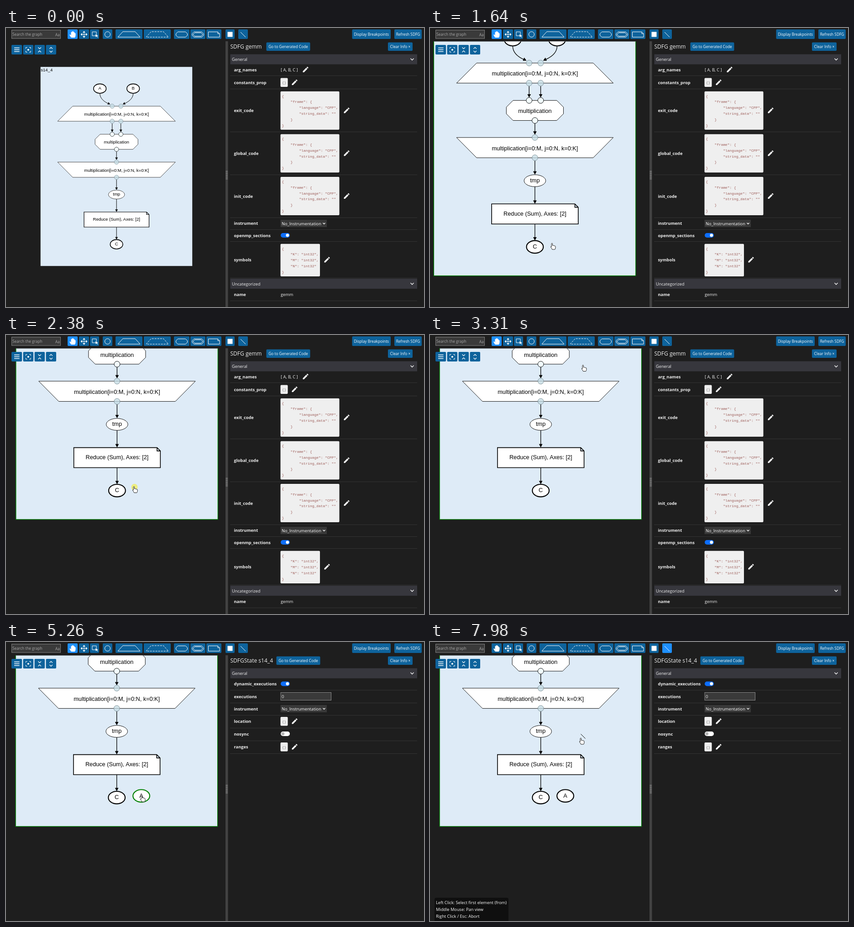
These frames come from a looping animation (916 px wide and 611 px high, 8 s). An HTML page:

```html
<!DOCTYPE html>
<html lang="en">
<head>
<meta charset="utf-8">
<title>Graph editor</title>
<style>
html, body { margin: 0; width: 100%; height: 100%; overflow: hidden; background: #1e1e1e; }
svg { display: block; }
text { font: 500 9.25px "Open Sans", "Noto Sans", sans-serif; fill: #f0f0f0; white-space: pre; }
.small { font-size: 8.3px; fill: #fff; }
.title { font-size: 12px; }
.key { font-weight: 700; font-size: 9.3px; }
.code { font: 7.9px "Liberation Mono", monospace; fill: #9c5b57; }
.btn { fill: #0e639c; }
.on { fill: #1e90ff; }
.icon { fill: none; stroke: #fff; stroke-width: 1; }
.bold { stroke-width: 1.3; }
.solid { fill: #fff; stroke: none; }
.white { fill: #fff; }
.dim { fill: #a8a8a8; font-weight: 400; }
.node text, .label { font: 9.55px "Liberation Sans", Arial, sans-serif; fill: #000; stroke: none; }
.node text { text-anchor: middle; }
.node { fill: #fff; stroke: #000; stroke-width: .7; }
.edge { fill: none; stroke: #000; }
.edge polygon { fill: #000; stroke: none; }
.hover { stroke: green; }
.edge.hover polygon { fill: green; }
</style>
</head>
<body>
<svg id="stage" width="916" height="611" viewBox="0 0 916 611"></svg>
<script>
const rect = (x, y, w, h, attrs = '') => `<rect x="${x}" y="${y}" width="${w}" height="${h}" ${attrs}/>`;
const text = (x, y, s, cls = '', attrs = '') => `<text x="${x}" y="${y}" class="${cls}" ${attrs}>${s}</text>`;
const path = (d, cls = 'icon', attrs = '') => `<path d="${d}" class="${cls}" ${attrs}/>`;
const group = (id, body, attrs = '') => `<g id="${id}" ${attrs}>${body}</g>`;

// ---- toolbar ----
const button = (x, w, icon = '', id = '', y = 3, h = 21) =>
  rect(x, y, w, h, `rx="2" class="btn" ${id && `id="${id}"`}`) + icon;
const label = (x, w, s, y = 3, h = 21) =>
  button(x, w, text(x + w / 2, y + h / 2 + 3, s, 'small', 'text-anchor="middle"'), '', y, h);
const trapezoid = (x, dash = '') => path(`M${x} 20l11-12h27l11 12z`, 'icon', dash);
const octagon = (x, y, w, h, c) =>
  `M${x + c} ${y}h${w - 2 * c}l${c} ${c}v${h - 2 * c}l${-c} ${c}h${2 * c - w}l${-c} ${-c}v${2 * c - h}z`;

const toolbar =
  rect(12.5, 4.5, 107, 18.5, 'fill="#3a3a3a" stroke="#858585"') +
  text(14, 17, 'Search the graph', 'small dim') + text(108, 18, 'Aa', 'small dim') +
  button(135, 22, path('M142 20L139.3 15.5Q139 13.8 141 14.5L142.5 16V9.5Q143.3 8 144.2 9.5V13V8Q145.2 6.5 146.2 8V13V7.7Q147.2 6.3 148.2 8V13V9.5Q149.3 8 150.3 9.7V13V11.5Q151.5 10.3 152.5 12V16Q152.5 19 150.5 21H143.5z', 'solid'), 'pan') +
  button(160, 22, path('M171 9.5V18M166.5 14H175.5') +
    path('M171 6.5l3 3.5h-6zM171 21.5l3-3.5h-6zM163.5 14l3.5-3v6zM178.5 14l-3.5-3v6z', 'solid')) +
  button(184, 20, path('M197 17h-8v-8.5h9v6') + path('M196 14l6 2.5l-2.5 1l2 2.5l-1 .8l-2-2.5l-1.8 1.8z', 'solid')) +
  button(212, 21, '<circle cx="222.5" cy="14" r="6" class="icon"/>', 'add') +
  button(240, 59, trapezoid(245)) +
  button(302, 59, trapezoid(307, 'stroke-dasharray="4 2"')) +
  button(368, 34, path(octagon(372.5, 8.5, 25, 11.5, 4))) +
  button(404, 33, path(octagon(408, 8.5, 25, 11.5, 4) + octagon(410.5, 10.5, 20, 7.5, 3))) +
  button(439, 33, path('M443.5 8.5h20.5l4 4v7.5h-24.5zM464 8.5v4h4')) +
  button(481, 20, rect(485.5, 8.5, 11, 11, 'class="solid"')) +
  button(509, 21, path('M514 9l11 11'), 'link') +
  label(758.5, 84.5, 'Display Breakpoints') + label(851, 60, 'Refresh SDFG');

const overlay =
  button(12, 23, path('M18 43.5h11.5M18 47.5h11.5M18 51.5h11.5', 'icon bold'), '', 37) +
  button(37.5, 22.5, path('M43.5 45.5v-3h3M51 42.5h3v3M54 50v3h-3M46.5 53h-3v-3') +
    '<circle cx="48.8" cy="47.7" r="2" class="solid"/>', '', 37) +
  button(62.5, 22.5, path('M70.5 42.5l3.2 3.2l3.2-3.2M70.5 53l3.2-3.2l3.2 3.2', 'icon bold'), '', 37) +
  button(87.5, 22.5, path('M95.5 45.5l3.2-3.2l3.2 3.2M95.5 50l3.2 3.2l3.2-3.2', 'icon bold'), '', 37);

const splitter = rect(481, 29, 5.5, 582, 'fill="#424242"') +
  path('M482.5 313v19M485 313v19', 'icon', 'stroke-dasharray="1 1.5"');

// ---- side panel ----
const chevron = (x, y, r) => path(`M${x - r} ${y - r / 2}l${r} ${r}l${r} ${-r}`, 'icon bold');
const line = y => rect(491, y, 410, 1, 'fill="#343434"');
const header = (y, s) => rect(491.5, y, 409.5, 22, 'fill="#37373d"') + text(495, y + 14.5, s) + chevron(890, y + 11, 3.5);
const key = (y, s) => text(499.5, y + 3.3, s, 'key');
const pencil = (x, y) => path('M-5.5 5.5v-2.5L2-4.5l2.5 2.5L-3 5.5zM2.7-5.2l1.2-1.2q.5-.3 1 0l1.5 1.5q.3.5 0 1l-1.2 1.2z',
  'solid', `transform="translate(${x} ${y})"`);
const box = (y, w, lines) => rect(601.5, y - .3, w, lines.length * 12.8 + 7.2, 'rx="2" fill="#efefef"') +
  lines.map((s, i) => text(604.5, y + 12.5 + i * 12.8, s, 'code')).join('');
const empty = y => rect(601.5, y - 10, 16, 19.5, 'rx="2" fill="#efefef"') +
  text(609.5, y + 2.5, '{}', 'code', 'text-anchor="middle" style="fill:#777"') + pencil(632, y);
const select = y => rect(601.5, y - 8, 101.5, 16, 'fill="#383838"') +
  text(604, y + 3.6, 'No_Instrumentation', 'white') + chevron(697, y, 2.5);
const toggle = (y, on) => rect(602, y - 5, 20, 10, `rx="5" fill="${on ? '#0d6efd' : '#fff'}"`) +
  `<circle cx="${on ? 616.8 : 606.8}" cy="${y}" r="3.4" fill="${on ? '#fff' : '#b5b5b5'}"/>`;
const panelTop = (title, x) => text(491.5, 45, title, 'title') +
  label(x, 96, 'Go to Generated Code', 31.5, 18.5) + label(837, 54, 'Clear Info ×', 31.5, 18.5) + header(57.5, 'General');

const frame = ['{', '    "frame": {', '        "language": "CPP",', '        "string_data": ""', '    }', '}'];
const symbols = ['{', ...['"K": "int32",', '"M": "int32",', '"N": "int32"'].map(s => '    ' + s), '}'];

const graphPanel = panelTop('SDFG gemm', 570.5) +
  [104, 133, 227, 321, 415, 441, 467, 547, 597].map(line).join('') +
  key(92, 'arg_names') + text(602, 95.3, '[ A, B, C ]') + pencil(656, 91.5) +
  key(119.5, 'constants_prop') + empty(119.5) +
  ['exit_code', 'global_code', 'init_code'].map((s, i) => {
    const y = 181 + i * 93.7;
    return key(y, s) + box(y - 42, 129, frame) + pencil(746, y);
  }).join('') +
  key(428, 'instrument') + select(428) +
  key(454.5, 'openmp_sections') + toggle(454, true) +
  key(508, 'symbols') + box(473, 86.5, symbols) + pencil(703, 508) +
  header(549, 'Uncategorized') + key(584, 'name') + text(602, 587.3, 'gemm');

const statePanel = panelTop('SDFGState s14_4', 592.5) +
  [105, 133, 160, 188, 216, 244].map(line).join('') +
  key(92, 'dynamic_executions') + toggle(91.5, true) +
  key(119.5, 'executions') + rect(602, 110.5, 110.5, 17, 'fill="#3a3a3a" stroke="#8a8a8a"') + text(604, 122.8, '0') +
  key(146.5, 'instrument') + select(146) +
  key(174, 'location') + empty(174) +
  key(202, 'nosync') + toggle(201, false) +
  key(230, 'ranges') + empty(230);

// ---- graph, in coordinates of its state box ----
const MID = 166.5, STATE_W = 332.5, STATE_H = 436;
const boxes = {};   // hover areas by id: x0, y0, x1, y1
const node = (id, x0, y0, x1, y1, shape, name, base) => {
  boxes[id] = [x0, y0, x1, y1];
  return group(id, shape + text((x0 + x1) / 2, base, name), 'class="node"');
};
const access = (id, x, y, name, rx = 13.8, width = 1.6) =>
  node(id, x - rx, y - 10.3, x + rx, y + 10.3,
    `<ellipse cx="${x}" cy="${y}" rx="${rx}" ry="${rx > 14 ? 9.8 : 10.3}" stroke-width="${width}"/>`, name, y + 2.7);
const arrow = (d, x, y, angle = 90, id = '') => group(id, path(d, '') +
  `<polygon points="0,0 -5.5,-2.9 -5.5,2.9" transform="translate(${x} ${y}) rotate(${angle})"/>`, 'class="edge"');
const down = (x, y0, y1, id) => arrow(`M${x} ${y0}V${y1 - 3}`, x, y1, 90, id);
const port = (x, y, pale) => `<circle cx="${x}" cy="${y}" r="4.8" stroke-width=".7" ` +
  (pale ? 'fill="#c5dde5" fill-opacity=".75" stroke="#7b8c94"/>' : 'fill="#f2fdff" stroke="#000"/>');
const range = 'multiplication[i=0:M, j=0:N, k=0:K]';

const graph =
  rect(0, 0, STATE_W, STATE_H, 'id="state" fill="#deebf7"') +
  text(.5, 10, 's14_4', 'label') +
  arrow('M130 58C130 70 141 77 149 80.5', 152.7, 82, 25) +
  arrow('M203 58C203 70 191.5 77 183.5 80.5', 180, 82, 155) +
  access('a', 130, 47.5, 'A') + access('b', 203, 47.5, 'B') +
  node('entry', 37.5, 86, 295.5, 119, path('M37.5 119l33-33h192l33 33z', ''), range, 106.8) +
  down(157, 124, 142.8) + down(176, 124, 142.8) +
  node('task', 119.5, 147.5, 213.5, 180.5, path(octagon(119.5, 147.5, 94, 33, 11), ''), 'multiplication', 168.3) +
  down(MID, 185.3, 203.9, 'out') +
  node('exit', 37.5, 208.5, 295.5, 241.8, path('M37.5 208.5h258l-33 33.3h-192z', ''), range, 229.8) +
  down(MID, 246.5, 269.5) +
  access('tmp', MID, 279.6, 'tmp', 17.8, .7) +
  down(MID, 289.5, 317.5) +
  node('reduce', 95.3, 317.8, 237.8, 350.8,
    path('M95.3 317.8h137l5.5 5.5v27.5h-142.5zM232.3 317.8v5.5h5.5', '', 'stroke-width="1.2"'), 'Reduce (Sum), Axes: [2]', 336.8) +
  down(MID, 351, 378) +
  access('c', MID, 388.5, 'C') + access('extra', 207, 385.7, 'A') +
  [[157, 86, 1], [176, 86, 1], [157, 119, 1], [176, 119, 1], [157, 147.5], [176, 147.5],
   [MID, 180.5], [MID, 208.5, 1], [MID, 241.8, 1]].map(p => port(...p)).join('');
boxes.out = [MID - 5, 185, MID + 5, 204];

// ---- floating parts ----
const hint = (id, w, lines) => {
  const y = 605 - lines.length * 15;
  return group(id, rect(10, y, w, 70, 'rx="4" fill="#0f0f0f"') +
    lines.map((s, i) => text(13, y + 13.5 + i * 15, s, 'white')).join(''));
};
const common = ['Middle Mouse: Pan view', 'Right Click / Esc: Abort'];
const tooltip = rect(0, 0, 49.5, 33, 'rx="3" fill="#1c1c1c" fill-opacity=".92"') +
  text(4, 12.5, 'tmp[i, j, k]', 'white', 'style="font-size:8.8px;font-weight:600"') +
  text(3.5, 27, 'Volume: 1', 'white', 'style="font-size:7.7px;font-weight:700"');
const pointer = path('M-3.8-6Q-2.7-7.7-1.5-6V-1.6Q-.4-2.5.8-1.3Q2-2 2.9-.8Q4.6-1.2 5 .6V3Q5 5 3.7 7H-2.2Q-3.5 4-5.5 1.7Q-5.7-.3-3.8 1.2z',
  '', 'fill="#fff" stroke="#222"');

document.getElementById('stage').innerHTML =
  '<clipPath id="view"><rect x="0" y="29.5" width="481" height="582"/></clipPath>' +
  `<g clip-path="url(#view)">${group('graph', graph)}</g>` +
  toolbar + overlay + splitter + group('graphPanel', graphPanel) + group('statePanel', statePanel) +
  hint('addHint', 198, ['Left Click: Place element', 'Ctrl + Left Click: Place and stay in Add Mode', ...common]) +
  hint('linkHint', 162, ['Left Click: Select first element (from)', ...common]) +
  '<circle id="ring" r="5.5" fill="none"/><path id="stroke" d="M-5-5L5 5" stroke="#000"/>' +
  group('tip', tooltip) +
  '<circle id="press" r="7" fill="#f4ee3f" fill-opacity=".65"/>' + group('cursor', pointer);

// ---- motion ----
const cursorKeys = [
  [0, 820, 640], [410, 820, 640], [1130, 280, 462], [1500, 280, 462], [1640, 270, 478], [1690, 270, 478],
  [2050, 268.5, 408], [2080, 268.5, 408], [2380, 283, 338.5], [2440, 285, 338], [2540, 283, 338], [2680, 283, 338],
  [3480, 345, 38], [3510, 345, 38], [3800, 222, 16], [4120, 222, 17], [4290, 246, 93], [4320, 255, 111],
  [4910, 300, 343], [6000, 300, 343], [6480, 415.5, 154], [6780, 487, 60], [6820, 487, 60], [7180, 519, 18],
  [7610, 520, 23], [7950, 339, 213], [7980, 333, 217], [8000, 330, 220]];
const dragKeys = [
  [1690, 0, 0], [2050, -2, -62.5], [2080, -2, -62.5], [2380, 13.5, -138.7], [2440, 15.5, -138.7], [2540, 12.8, -138.7]];
const presses = [[1690, 2540], [3800, 3920], [4950, 5100], [7200, 7310]];

// Smooth curve through the keys, resting where a point repeats.
function track(keys, t) {
  const i = keys.findIndex(k => k[0] > t);
  if (i <= 0) return (i ? keys[keys.length - 1] : keys[0]).slice(1);
  const same = (p, q) => Math.hypot(p[1] - q[1], p[2] - q[2]) < 6;
  const slope = (j, c) => {
    const p = keys[j - 1], k = keys[j], n = keys[j + 1];
    return !p || !n || same(p, k) || same(k, n) ? 0 : (n[c] - p[c]) / (n[0] - p[0]);
  };
  const a = keys[i - 1], b = keys[i], span = b[0] - a[0], u = (t - a[0]) / span, v = 1 - u;
  return [1, 2].map(c => a[c] * v * v * (1 + 2 * u) + b[c] * u * u * (3 - 2 * u) +
    span * u * v * (v * slope(i - 1, c) - u * slope(i, c)));
}

const el = id => document.getElementById(id);
const show = (id, on) => el(id).style.display = on ? '' : 'none';
const move = (id, x, y, more = '') => el(id).setAttribute('transform', `translate(${x} ${y}) ${more}`);
const within = (x, y, [x0, y0, x1, y1]) => x >= x0 && x <= x1 && y >= y0 && y <= y1;

function draw(t) {
  const [cx, cy] = track(cursorKeys, t);
  const [mx, my] = track(cursorKeys, t - 30).map((v, i) => v - [3, 7][i]);   // the view reacts a little late
  const scale = 1.1 ** [1260, 1380, 1500].filter(s => t >= s).length;
  const [dx, dy] = track(dragKeys, t);
  const left = 279.4 - 203.7 * scale + dx, top = 456.5 - 371.3 * scale + dy;
  const adding = t >= 3860 && t < 5040, linking = t >= 7240, placed = t >= 5040;
  const onCanvas = mx < 481 && my > 30;
  const lx = (mx - left) / scale, ly = (my - top) / scale;

  move('graph', left, top, `scale(${scale})`);
  const green = onCanvas ? within(lx, ly, [0, 0, STATE_W, STATE_H]) : my <= 30 && t < 5000;
  el('state').setAttribute('stroke', green ? 'green' : 'none');
  show('extra', placed);
  let hit = '';
  for (const id in boxes) {
    const over = onCanvas && within(lx, ly, boxes[id]) && (id !== 'extra' || placed);
    el(id).classList.toggle('hover', over);
    if (over) hit = id;
  }

  el('pan').classList.toggle('on', !adding && !linking);
  el('add').classList.toggle('on', adding);
  el('link').classList.toggle('on', linking);
  show('addHint', adding);
  show('linkHint', linking);
  show('graphPanel', !placed);
  show('statePanel', placed);

  show('ring', adding && onCanvas);
  el('ring').setAttribute('stroke', hit ? '#d22' : '#000');
  show('stroke', linking && onCanvas);
  show('tip', hit === 'out');
  move('ring', mx, my);
  move('stroke', mx, my);
  move('tip', mx + 13, my - 2);
  show('press', presses.some(([a, b]) => t >= a && t < b));
  move('press', cx - 1.5, cy - 5.5);
  move('cursor', cx, cy);
}

const start = performance.now();
function tick() {
  draw((performance.now() - start) % 8000);
  requestAnimationFrame(tick);
}
tick();
</script>
</body>
</html>
```
